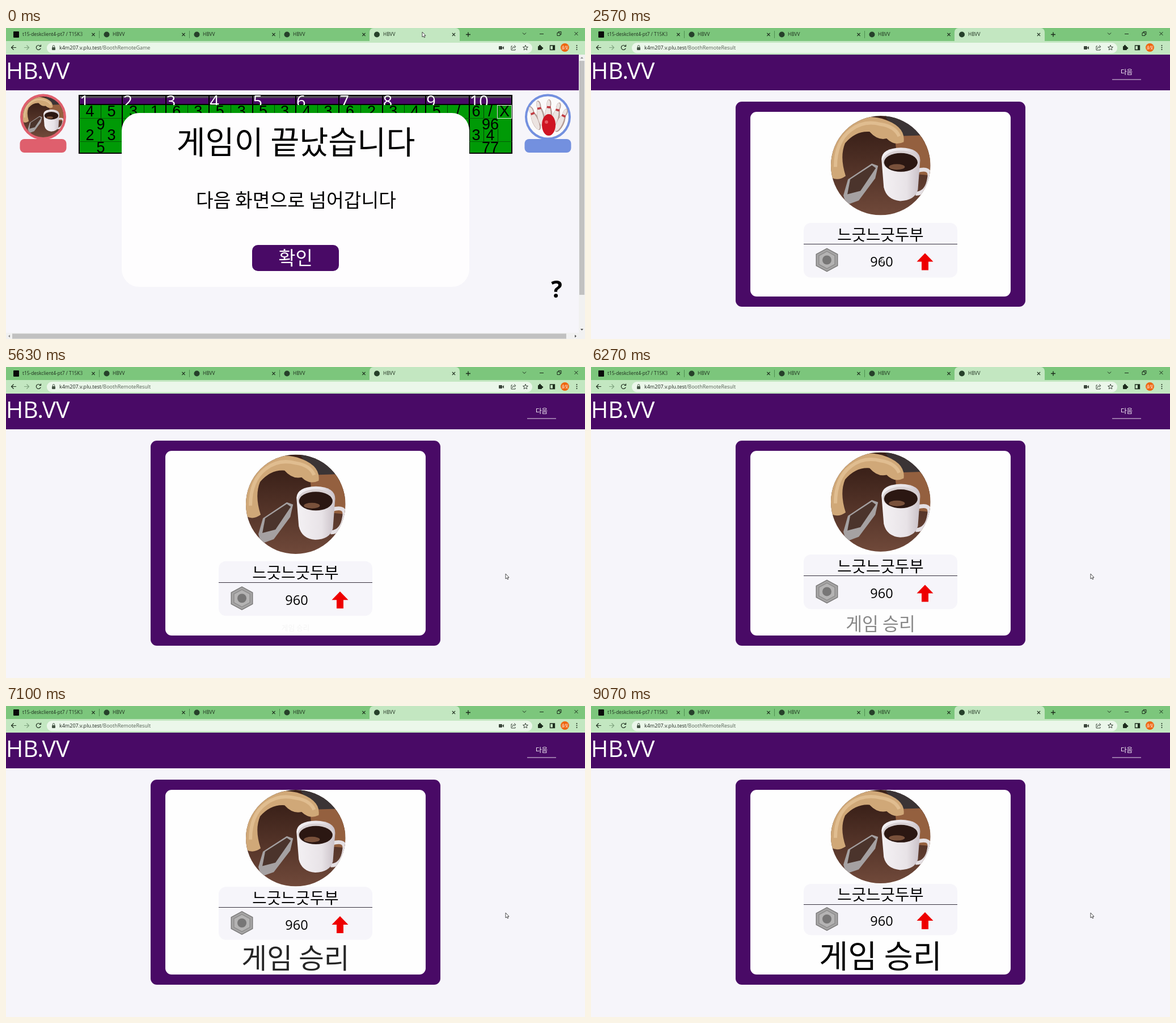
Write an HTML page with a canvas that moves like this. It is 1021 px wide and 549 px high and loops after 9.11 s.

```html
<!DOCTYPE html>
<html lang="ko">
<head>
<meta charset="utf-8">
<style>
html, body { margin: 0; width: 100%; height: 100%; overflow: hidden; background: #f6f5fa; }
canvas { display: block; }
</style>
</head>
<body>
<canvas id="stage" width="1021" height="549"></canvas>
<script>
const ctx = document.getElementById('stage').getContext('2d');
const LOOP = 9110, PAGE_AT = 2445, GROW_AT = 5445, GROW_MS = 3000;
const PURPLE = '#490a66', INK = '#1c2b1c', PAPER = '#f6f5fa';
const LATIN = '"Open Sans", "Noto Sans", sans-serif';
const HANGUL = '"Noto Sans CJK KR", "Noto Sans CJK", "Noto Sans", sans-serif';
const ARIAL = '"Liberation Sans", Arial, sans-serif';

const lerp = (a, b, k) => a + (b - a) * k;
const clamp = v => Math.max(0, Math.min(1, v));

// cubic-bezier(.25, .1, .25, 1)
function ease(x) {
  let lo = 0, hi = 1, u = x;
  for (let i = 0; i < 30; i++) {
    u = (lo + hi) / 2;
    const bx = .75 * u * (1 - u) + u ** 3;
    if (bx < x) lo = u; else hi = u;
  }
  return .3 * u * (1 - u) ** 2 + 3 * u * u * (1 - u) + u ** 3;
}

function rect(x, y, w, h, color) {
  ctx.fillStyle = color;
  ctx.fillRect(x, y, w, h);
}
function round(x, y, w, h, r, color) {
  ctx.fillStyle = color;
  ctx.beginPath();
  ctx.roundRect(x, y, w, h, r);
  ctx.fill();
}
function oval(x, y, rx, ry, color) {
  ctx.fillStyle = color;
  ctx.beginPath();
  ctx.ellipse(x, y, rx, ry, 0, 0, 7);
  ctx.fill();
}
const dot = (x, y, r, color) => oval(x, y, r, r, color);
function poly(points, color) {
  ctx.fillStyle = color;
  ctx.beginPath();
  points.forEach(p => ctx.lineTo(p[0], p[1]));
  ctx.closePath();
  ctx.fill();
}
function stroke(d, color = INK, width = 1.2) {
  ctx.strokeStyle = color;
  ctx.lineWidth = width;
  ctx.stroke(new Path2D(d));
}
function text(s, x, y, size, color, align = 'left', family = LATIN, weight = 400) {
  ctx.font = `${weight} ${size}px ${family}`;
  ctx.fillStyle = color;
  ctx.textAlign = align;
  ctx.fillText(s, x, y);
}
const hangul = (s, cx, cy, size, color = '#000') =>
  text(s, cx, cy + size * .37, size, color, 'center', HANGUL, 300);

function cross(x, y, r, width = 1.2) {
  stroke(`M${x - r} ${y - r}L${x + r} ${y + r}M${x + r} ${y - r}L${x - r} ${y + r}`, INK, width);
}

// Glow on the second tab while the pointer passes over it
function tabGlow(t) {
  const a = Math.min(clamp((t - 1150) / 200), clamp((1800 - t) / 250));
  if (!a) return;
  const glow = ctx.createRadialGradient(275, 12, 0, 275, 12, 110);
  glow.addColorStop(0, '#c3e7c1');
  glow.addColorStop(1, '#8fce8f');
  ctx.globalAlpha = a;
  round(164, 0, 160, 24, [7, 7, 0, 0], glow);
  ctx.globalAlpha = 1;
}

function tabs(t) {
  rect(0, 0, 1021, 24, '#7cc67c');
  tabGlow(t);
  round(641, 0, 159, 24, [7, 7, 0, 0], '#c3e7c1');
  round(13, 6, 10, 11, 1, '#0a0a0a');
  ctx.save();
  ctx.beginPath();
  ctx.rect(28, 0, 118, 23);
  ctx.clip();
  const fade = ctx.createLinearGradient(130, 0, 146, 0);
  fade.addColorStop(0, INK);
  fade.addColorStop(1, '#7cc67c');
  text('t15-deskclient4-pt7 / T15K3', 29, 14, 8.4, fade);
  ctx.restore();
  [164, 323, 482].forEach(x => {
    rect(x, 5, 1, 13, '#4f8f50');
    dot(x + 13.5, 11.5, 5, '#26402a');
    text('HBVV', x + 24, 14, 8.4, INK);
    cross(x - 10, 11.5, 2.6);
  });
  dot(654, 11.5, 5, '#26402a');
  text('HBVV', 665, 14, 8.4, INK);
  cross(631, 11.5, 2.6);
  cross(789.5, 11.5, 2.6);
  stroke('M811 11.5h8M815 7.5v8', INK, 1.4);
  stroke('M911 8.5l3 3l3-3M941 10.5h7', INK, 1);
  stroke('M972 8.5h5v5h-5zM974 8.5v-2h5v5h-2', INK, 1);
  cross(1005.5, 10, 3, 1);
}

function toolbar(page) {
  rect(0, 23, 1021, 24, '#c3e7c1');
  round(72, 26, 856, 18.5, 9, '#ebf7ea');
  stroke('M18 34.5h-8M13.5 30.5l-4 4l4 4');
  stroke('M32 34.5h8M36.5 30.5l4 4l-4 4', '#7fa47f');
  stroke('M60.5 32a4 4 0 1 0 .7 3.6M61.5 29.5v3h-3');
  round(81, 34, 6, 5, 1, '#455545');
  stroke('M82.3 34v-1.6a1.7 1.7 0 0 1 3.4 0v1.6', '#455545', 1);
  const host = 'k4m207.v.plu.test';
  text(host, 94, 38, 9, '#1d261d');
  text('/BoothRemote' + page, 94 + ctx.measureText(host).width, 38, 9, '#536053');
  round(869, 32, 6, 6, 1, '#3b463b');
  poly([[875, 35], [878, 32], [878, 38]], '#3b463b');
  stroke('M893 32h-2v7h7v-2M893 37q0-4 4-4M896 30.5l3 2.5l-3 2.5', '#3b463b', 1);
  const star = Array.from({ length: 10 }, (_, i) => {
    const r = i % 2 ? 2 : 4.7, a = i * Math.PI / 5 - Math.PI / 2;
    return `${916 + r * Math.cos(a)} ${35 + r * Math.sin(a)}`;
  });
  stroke('M' + star.join('L') + 'Z', '#3b463b', 1);
  round(938, 32, 7, 7, 1, INK);
  dot(941.5, 31.5, 1.7, INK);
  dot(945.5, 35.5, 1.7, INK);
  stroke('M959.5 31h8v7.5h-8z', INK, 1.3);
  rect(964, 31, 4, 8, INK);
  dot(985.5, 34.5, 7.5, '#ee650f');
  hangul('솔빛', 985.5, 34.5, 6.5, '#fff');
  [31, 34.5, 38].forEach(y => dot(1006.5, y, 1, INK));
}

function header(width) {
  rect(0, 47, width, 63, PURPLE);
  text('HB.VV', 0, 90, 41, '#fff');
}

// Coffee picture in a 175 x 175 box
function coffee(x, y, w, h) {
  ctx.save();
  ctx.translate(x, y);
  ctx.scale(w / 175, h / 175);
  ctx.beginPath();
  ctx.arc(87.5, 87.5, 87.5, 0, 7);
  ctx.clip();
  const base = ctx.createLinearGradient(0, 30, 0, 175);
  base.addColorStop(0, '#3b2119');
  base.addColorStop(1, '#70493a');
  rect(0, 0, 175, 175, base);
  poly([[95, 0], [175, 0], [175, 50], [120, 36]], '#3b3435');
  poly([[112, 36], [175, 34], [175, 105], [120, 100]], '#94603f');
  ctx.fillStyle = '#d0a878';
  ctx.fill(new Path2D('M0 108L0 30Q35-8 90 5Q132 18 128 46Q112 54 98 40Q82 44 68 28Q44 26 25 48Q15 72 26 106Q12 116 0 108Z'));
  stroke('M8 90Q8 45 35 25Q58 7 88 15Q113 19 120 36', '#e0bd90', 6);
  poly([[30, 112], [72, 84], [83, 88], [78, 110], [49, 149], [27, 157], [22, 140]], '#a5a1a2');
  poly([[34, 112], [72, 87], [79, 92], [52, 132], [29, 138]], '#4b342c');
  stroke('M151 97Q177 89 173 110Q169 137 149 137', '#e4dfe3', 7);
  const mug = ctx.createLinearGradient(89, 0, 157, 0);
  mug.addColorStop(0, '#f4f1f4');
  mug.addColorStop(.65, '#e8e3e7');
  mug.addColorStop(1, '#c9c0c7');
  ctx.fillStyle = mug;
  ctx.fill(new Path2D('M89 76Q90 57 123 56Q157 57 157 78L153 130Q148 149 122 150Q98 148 93 126Z'));
  oval(123, 80, 32, 19, '#d8d0d2');
  oval(123, 82, 29.5, 16.5, '#2b1712');
  oval(116, 90, 14, 5, '#79513b');
  ctx.restore();
}

function pins() {
  dot(955.5, 157, 36.5, '#fbfafa');
  [[930, 154, -.4], [941, 145, -.2], [957, 143, .05], [972, 148, .25], [982, 158, .45]].forEach(([x, y, a]) => {
    ctx.save();
    ctx.translate(x, y);
    ctx.rotate(a);
    oval(0, 11, 6.5, 17, '#b39a94');
    oval(-1, 11, 5, 16, '#ece4e1');
    oval(0, -9, 4, 8, '#b39a94');
    oval(-.7, -9, 3, 7, '#ece4e1');
    rect(-3.5, -5, 7, 3.5, '#c23b42');
    ctx.restore();
  });
  oval(957, 171, 12, 19, '#cf1422');
  dot(953, 166, 3, '#e65b62');
}

function player(cx, color) {
  dot(cx, 157, 40.5, color);
  round(cx - 41, 196, 82, 24, 8, color);
}

function board() {
  const pairs = ['45', '31', '63', '53', '53', '43', '62', '34', '5/'];
  const left = i => 129 + i * 76.4;
  const num = (s, x, y) => text(s, x, y, 27, '#000', 'center', ARIAL);
  rect(128, 118, 765, 104, '#000');
  rect(130, 120, 761, 14, PURPLE);
  rect(130, 120, 761, 3.5, '#555058');
  ctx.save();
  ctx.beginPath();
  ctx.rect(128, 118, 765, 18);
  ctx.clip();
  for (let i = 0; i < 10; i++) text(i + 1, left(i) + 1, 140, 29, '#fff');
  ctx.restore();
  rect(130, 136, 761, 84, '#009a06');
  for (let i = 0; i < 10; i++) {
    const x = left(i);
    if (i) rect(Math.round(x) - 1, 118, 2, 104, '#000');
    [159, 200].forEach(y => rect(x, y, 76, 1, '#075c08'));
    (i < 9 ? [38] : [25, 50]).forEach(d => {
      rect(Math.round(x + d), 136, 1, 23, '#063f07');
      rect(Math.round(x + d), 178, 1, 22, '#063f07');
    });
    if (i < 9) [...pairs[i]].forEach((s, k) => num(s, x + 19 + k * 38, 156));
  }
  [...'6/X'].forEach((s, k) => num(s, 829 + k * 25, 156));
  ctx.strokeStyle = '#e8f5e8';
  ctx.lineWidth = 1;
  ctx.strokeRect(866.5, 136.5, 25, 23);
  num('9', 167, 179);
  num('2', 148, 198);
  num('3', 186, 198);
  num('5', 167, 220);
  num('96', 854, 179);
  num('3', 829, 198);
  num('4', 854, 198);
  num('77', 854, 220);
}

function scrollbars() {
  rect(1010, 47, 11, 502, '#f1f1f1');
  rect(0, 538, 1021, 11, '#f1f1f1');
  rect(1011, 58, 9, 413, '#c1c1c1');
  rect(11, 539.5, 977, 9, '#c1c1c1');
  poly([[1013, 54], [1018, 54], [1015.5, 51]], '#8b8b8b');
  poly([[1013, 531], [1018, 531], [1015.5, 534]], '#505050');
  poly([[7, 541.5], [7, 546.5], [4, 544]], '#8b8b8b');
  poly([[1003, 541.5], [1003, 546.5], [1006, 544]], '#505050');
}

function gamePage() {
  header(1010);
  player(65.5, '#df5f6d');
  coffee(29.5, 121, 72, 72);
  player(955.5, '#7390df');
  pins();
  board();
  round(204, 150, 613, 307, 31, '#fefdfe');
  hangul('게임이 끝났습니다', 511, 201, 55.5);
  hangul('다음 화면으로 넘어갑니다', 511.5, 304, 33.4);
  round(434, 383, 153, 46, 10, PURPLE);
  hangul('확인', 510.5, 406, 33, '#fff');
  text('?', 971, 476, 41, '#000', 'center', LATIN, 700);
  scrollbars();
}

function medal(x, y) {
  const hex = r => Array.from({ length: 6 }, (_, i) => {
    const a = i * Math.PI / 3 - Math.PI / 2;
    return [x + r * 1.07 * Math.cos(a), y + r * Math.sin(a)];
  });
  poly(hex(21), '#777676');
  poly(hex(19.5), '#a5a4a4');
  poly(hex(16), '#8b8a8a');
  poly(hex(14.5), '#b4b3b3');
  dot(x, y, 8, '#777676');
}

function resultPage(t) {
  const p = ease(clamp((t - GROW_AT) / GROW_MS));
  // Past FULL the column has no free space and its items shrink
  const FULL = .71;
  const free = Math.min(p, FULL) / FULL;
  const tight = Math.max(0, p - FULL) / (1 - FULL);
  const picY = lerp(155, 148, free), picH = lerp(175.5, 165, tight);
  const top = lerp(lerp(344, 324, free), 314, tight), boxH = lerp(96.5, 90.5, tight);
  const row = top + lerp(68.5, 65, tight);

  header(1021);
  hangul('다음', 944.5, 78, 11.5, '#fff');
  rect(919, 90.5, 51, 1, '#e6dcea');
  round(255, 130, 511, 362, 11, PURPLE);
  round(281, 148, 459, 326, 11, '#fefefe');
  coffee(423, picY, 175.5, picH);
  round(375, top, 271, boxH, 13, PAPER);
  hangul('느긋느긋두부', 510.5, top + lerp(20.5, 19, tight), 27.6);
  rect(375, Math.round(top + lerp(37, 35.5, tight)), 271, 1, '#35303c');
  medal(416, row - 3);
  text('960', 512.5, row + 8.7, 23.5, '#000', 'center');
  poly([[589, row - 15], [603.5, row], [595, row], [595, row + 15], [583, row + 15], [583, row], [574.5, row]], '#ee0000');
  if (p > 0) {
    ctx.globalAlpha = p;
    hangul('게임 승리', 510.5, lerp(lerp(461, 448.6, free), 441, tight), lerp(10.7, 55.5, p));
    ctx.globalAlpha = 1;
  }
}

// Pointer stops: time, x, y
const PATH = [[0, 734, 7], [250, 734, 7], [1300, 272, 11], [1450, 278, 15], [1630, 304, 86], [2200, 512, 406], [2600, 512, 406], [3500, 881, 365]];
function pointer(t) {
  let i = 0;
  while (i < PATH.length - 2 && t > PATH[i + 1][0]) i++;
  const [a, b] = [PATH[i], PATH[i + 1]];
  const k = clamp((t - a[0]) / (b[0] - a[0])), s = k * k * (3 - 2 * k);
  ctx.save();
  ctx.translate(lerp(a[1], b[1], s), lerp(a[2], b[2], s));
  const arrow = 'M0 0V9L2 7.2L3.4 10L4.8 9.3L3.5 6.5H6Z';
  ctx.fillStyle = '#fff';
  ctx.fill(new Path2D(arrow));
  stroke(arrow, '#222', .8);
  ctx.restore();
}

function draw(t) {
  const ended = t >= PAGE_AT;
  rect(0, 0, 1021, 549, PAPER);
  if (ended) resultPage(t); else gamePage();
  tabs(t);
  toolbar(ended ? 'Result' : 'Game');
  pointer(t);
}

const start = performance.now();
function frame() {
  draw((performance.now() - start) % LOOP);
  requestAnimationFrame(frame);
}
draw(0);
requestAnimationFrame(frame);
</script>
</body>
</html>
```
